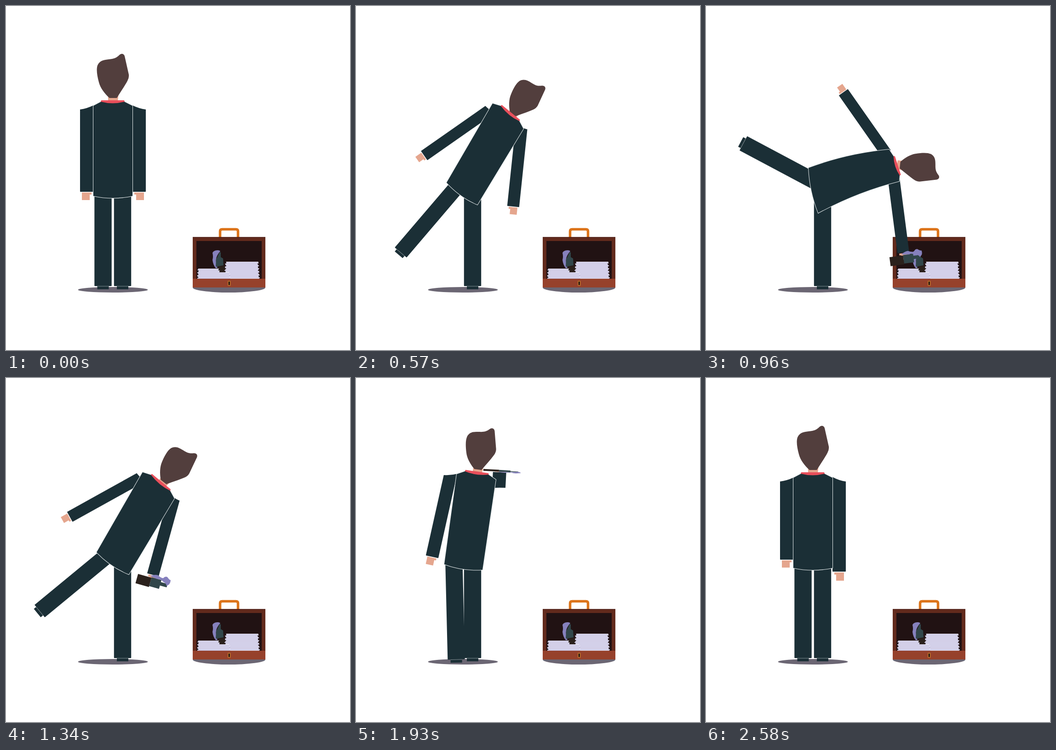
Animation of 748x748 px, one loop 2.68 s. Source, as an HTML page:

```html
<!DOCTYPE html>
<html lang="en">
<head>
<meta charset="utf-8">
<title>Briefcase</title>
<style>
  html, body { margin: 0; width: 100%; height: 100%; overflow: hidden; background: #fff; }
  svg { display: block; width: 100vw; height: 100vh; }
  .suit { fill: #1b2f36; }
  .skin { fill: #e5a68e; }
  .hair { fill: #523e3d; }
  .shade { fill: #6b6673; }
  .cloth { fill: #8681bd; }
  .glass { fill: #31464a; }
  .base { fill: #2b211c; }
  .seam { stroke: #e3e9ea; stroke-width: 2; paint-order: stroke; }
</style>
</head>
<body>
<svg viewBox="0 0 748 748">
  <defs>
    <g id="arm">
      <path class="suit" d="M-14 0Q1-2 15-9V178q0 1-1 1H-13q-1 0-1-1Z"/>
      <path class="skin" d="M-10 180.500H11V185H7V197H-10Z"/>
    </g>
    <g id="leg">
      <path class="suit" d="M-18.700-16H18.700V190q0 1-1 1H-17.700q-1 0-1-1Z"/>
      <path class="suit" d="M-12.500 191H12.500V198H-12.500Z"/>
      <path d="M-12.500 191.300H12.500" stroke="#a9b3b6" stroke-width=".7"/>
    </g>
  </defs>

  <ellipse class="shade" cx="232.500" cy="617" rx="76" ry="6"/>

  <g id="case">
    <ellipse class="shade" cx="485" cy="612" rx="79" ry="11"/>
    <path d="M465.500 503V490q0-4.500 4.500-4.500h30q4.500 0 4.500 4.500V503" fill="none" stroke="#dc741b" stroke-width="5.500"/>
    <path d="M406 502.500H564V612H406Z" fill="#622a1c"/>
    <path d="M406 502.500H564V504H406Z" fill="#4d1d14"/>
    <path d="M414 511H556V594H414Z" fill="#211213"/>
    <g>
      <path class="cloth" d="M449 537Q450 533 456 531.500Q463 530 466 533L462 538Q455 548 457 558L460 570H456Q450 562 449 552Q451 545 449 537Z"/>
      <path class="glass" d="M459 547L464 536L467 535V546L472 549L473 564L456 567L457 549Z"/>
      <path class="base" d="M459 567L475 565L477 578H462Z"/>
    </g>
    <g id="papers"></g>
    <path d="M406 593H564V612H406Z" fill="#96412b"/>
    <rect x="483" y="598.500" width="4.500" height="9" fill="#1c1010" stroke="#c87a2a" stroke-width="1.500"/>
  </g>

  <use href="#leg" transform="translate(253.500 418)"/>
  <use href="#leg" id="legL"/>
  <use href="#arm" id="armL"/>
  <g id="armR">
    <use href="#arm" transform="scale(-1 1)"/>
    <g id="bottle" transform="translate(0 178)">
      <path class="base" d="M-36 8H-2V30H-36Z"/>
      <path class="glass" d="M-2 7H23V12H40V20H23V28H-2Z"/>
      <path class="cloth" d="M-6 5Q2-1 11-1.500Q20 3 26 2Q29-4 35-3Q41 2 45 2Q46 8 44 12L39 17Q36 11 29 10Q20 5 13 7.500Z"/>
    </g>
  </g>
  <g id="head">
    <path class="skin" d="M-11-4L12-12L10 6H-11Z"/>
    <path class="hair" d="M12-93C17-99 23-98 25-92L34-52Q35-45 31-38C24-25 14-11 8-1H-8C-19-11-28-23-31-35C-35-50-37-63-34-72C-29-83-19-84-10-85C2-86 6-88 12-93Z"/>
  </g>
  <path id="torso" class="suit seam"/>
  <path id="collar" fill="#e84f5b"/>
</svg>

<script>
const LOOP = 2680;
const PIVOT = [253, 425];
const el = id => document.getElementById(id);
const lerp = (a, b, k) => a + (b - a) * k;

// Paper piles down to the rim: x, top, width
function pile(x, top, width) {
  let out = '';
  for (let y = top, i = 0; y < 593; y += 2, i++) {
    const left = x + Math.sin(i * 1.9 + x) * 1.5 - i * 0.15, w = width + i * 0.3;
    out += `<rect x="${left}" y="${y}" width="${w}" height="1" fill="#f3f1fb"/>` +
      `<rect x="${left}" y="${y + 1}" width="${w}" height="1" fill="#b3aed6"/>`;
  }
  return out;
}
el('papers').innerHTML = pile(418, 571, 45) + pile(478, 556, 70) + pile(456, 579, 30);

// Pose: torso turn and corners (TL, TR, BR, BL), then limbs as x, y, angle, scaleX, scaleY
const rest = {
  turn: 0, bow: 0,
  body: [[190, 217], [275, 217], [275, 413], [190, 413]],
  head: [233, 201, 0, 1, 1],
  armL: [175, 225, 0, 1, 1],
  armR: [290, 225, 0, 1, 1],
  legL: [211, 418, 0, 1, 1]
};
const lean = {
  turn: 31, bow: 0,
  body: [[297, 212], [364, 267], [264, 432], [197, 384]],
  head: [340, 236, 37.5, 0.94, 0.94],
  armL: [288, 227, 55, 0.84, 0.955],
  armR: [360, 267, 6, 0.9, 0.95],
  legL: [215, 398, 40.5, 0.9, 0.95]
};
const reach = {
  turn: 74, bow: 7,
  body: [[398, 312], [420, 381], [244, 450], [223, 352]],
  head: [421, 346, 96, 0.91, 0.91],
  armL: [392, 320, 145, 0.83, 0.905],
  armR: [409, 378, -7.4, 0.88, 0.89],
  legL: [238, 382, 118, 0.94, 0.93]
};
const lift = {
  turn: 31, bow: 0,
  body: [[297, 205], [366, 262], [267, 427], [197, 379]],
  head: [342, 227, 38, 0.96, 0.96],
  armL: [290, 217.5, 61, 0.85, 0.968],
  armR: [365.5, 263.5, 15.5, 0.89, 0.955],
  legL: [215, 390, 50.5, 0.94, 0.962]
};
const hold = { ...rest,
  head: [232, 201, -3.5, 1, 1],
  armL: [175, 226, -2.5, 1, 1],
  armR: [275.5, 217.5, -14.6, 0.96, 0.975]
};
const drink = {
  turn: 8, bow: 0,
  body: [[219, 209], [304, 221], [275, 417], [192, 405]],
  head: [265, 200, 8, 0.97, 0.97],
  armL: [204, 214, 12.6, 0.96, 1],
  armR: [311, 238, 3, 1, -0.185],
  legL: [213.4, 421, -1.4, 1, 1]
};
const gulp = { ...drink, armR: [311, 238, 3, 1, -0.98] };
const settle = { ...rest, armL: [175, 225, 0.6, 1, 1], armR: [290, 225, -2, 1, 1] };
const end = { ...rest, armL: [175, 225, 0, 1, 0.95], armR: [290, 225, 0, 1, 1.095] };

const track = [
  [0, rest], [60, rest], [570, lean], [960, reach], [1100, reach], [1340, lift],
  [1560, hold], [1590, hold], [1930, drink], [2045, gulp], [2270, settle], [2580, end], [LOOP, end]
];

// Start time and number of steps of each run
const runs = [
  [0, 1], [120, 5], [570, 1], [630, 1], [680, 7], [960, 1], [1070, 1], [1170, 1], [1260, 2],
  [1340, 1], [1410, 3], [1560, 1], [1590, 4], [1750, 1], [1810, 2], [1930, 1], [1970, 4],
  [2270, 1], [2340, 7], [2580, 1], [LOOP, 1]
];

function snap(t) {
  const i = runs.findIndex(r => r[0] > t) - 1;
  const [start, n] = runs[i], step = (runs[i + 1][0] - start) / n;
  return start + Math.floor((t - start) / step) * step;
}

function spin([x, y], deg) {
  const r = deg * Math.PI / 180, c = Math.cos(r), s = Math.sin(r);
  const dx = x - PIVOT[0], dy = y - PIVOT[1];
  return [PIVOT[0] + dx * c - dy * s, PIVOT[1] + dx * s + dy * c];
}

// Blends in the turning frame of the torso, so points travel on arcs
function mix(p, q, k) {
  const turn = lerp(p.turn, q.turn, k);
  const point = (a, b) => {
    const u = spin(a, -p.turn), v = spin(b, -q.turn);
    return spin([lerp(u[0], v[0], k), lerp(u[1], v[1], k)], turn);
  };
  const out = { turn, bow: lerp(p.bow, q.bow, k), body: p.body.map((c, i) => point(c, q.body[i])) };
  for (const part of ['head', 'armL', 'armR', 'legL'])
    out[part] = [...point(p[part], q[part]), ...[2, 3, 4].map(i => lerp(p[part][i], q[part][i] ?? p[part][i], k))];
  return out;
}

function poseAt(t) {
  const i = track.findIndex(key => key[0] > t) - 1;
  const [t0, p] = track[i], [t1, q] = track[i + 1];
  return mix(p, q, (t - t0) / (t1 - t0));
}

function drawBody({ body: [tl, tr, br, bl], bow, turn }) {
  const u = [0, 1].map(i => (tr[i] - tl[i]) / 85);
  const v = [0, 1].map(i => (bl[i] + br[i] - tl[i] - tr[i]) / 392);
  const at = (x, y) => [0, 1].map(i => tl[i] + u[i] * x + v[i] * y);
  const mid = (a, b, x, y) => [0, 1].map(i => (a[i] + b[i]) / 2 + u[i] * x + v[i] * y);
  const side = -2 * bow;
  // The collar slides a little as the torso tips over
  const slide = turn / 20;
  const neck = (x, y) => at(x + slide, y + slide);
  el('torso').setAttribute('d',
    `M${tl}L${neck(17, -9)}L${neck(67, -9)}L${tr}Q${mid(tr, br, side, 0)} ${br}` +
    `Q${mid(br, bl, 0, 9)} ${bl}Q${mid(bl, tl, side, 0)} ${tl}Z`);
  el('collar').setAttribute('d',
    `M${neck(17, -12)}L${neck(67, -12)}L${neck(68, -9)}Q${neck(42, -2)} ${neck(16, -9)}Z`);
}

function render(t) {
  const pose = poseAt(t);
  for (const part of ['head', 'armL', 'armR', 'legL']) {
    const [x, y, turn, sx, sy] = pose[part];
    el(part).setAttribute('transform', `translate(${x} ${y}) rotate(${turn}) scale(${sx} ${sy})`);
  }
  drawBody(pose);
  el('bottle').style.display = t > 940 && t < 2190 ? '' : 'none';
}

const begin = performance.now();
function tick() {
  render(snap((performance.now() - begin) % LOOP));
  requestAnimationFrame(tick);
}
tick();
</script>
</body>
</html>
```
